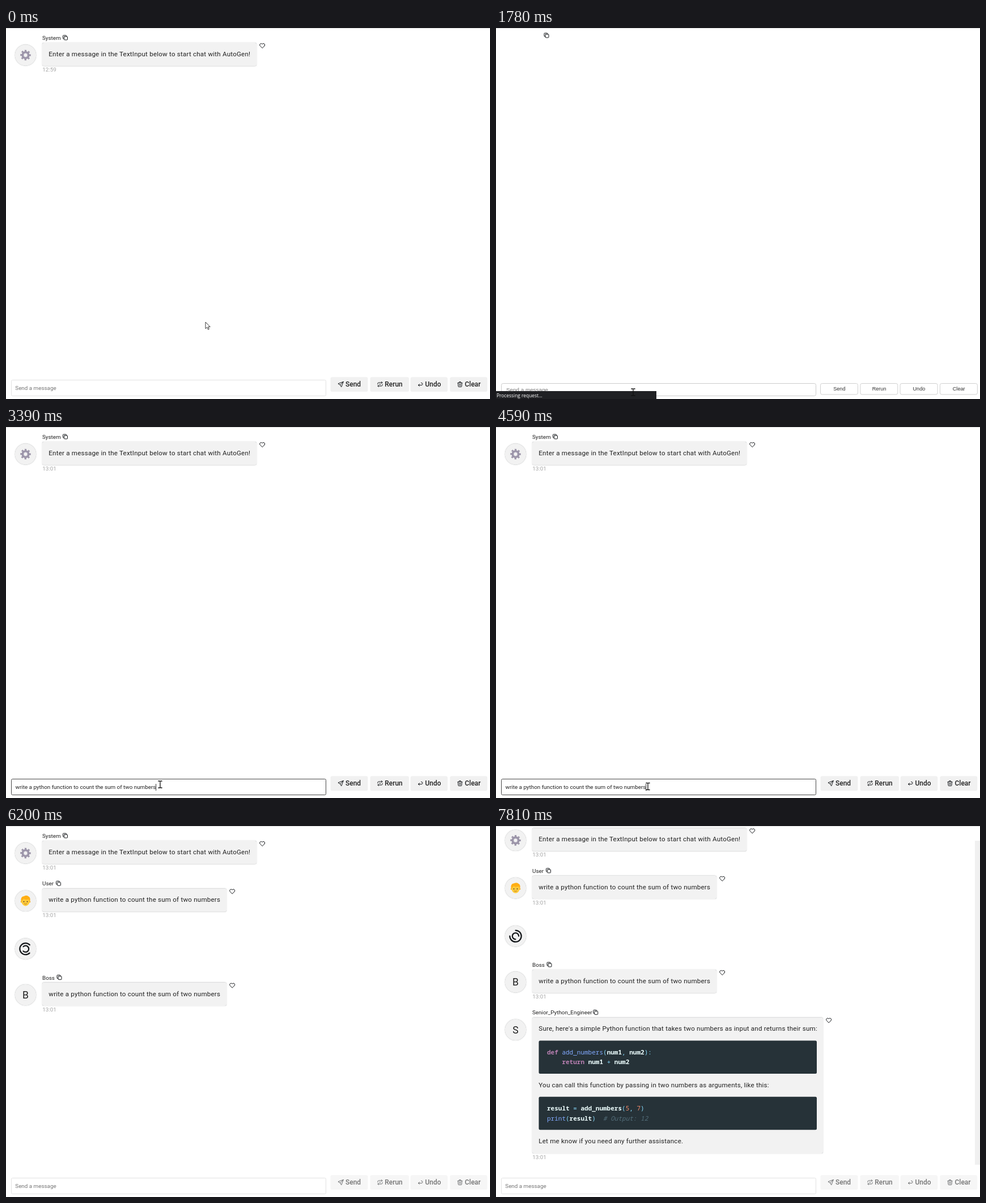
Recreate the animation shown at these times as an HTML page. Size 854x656 px, loop 8 s.

```html
<!DOCTYPE html>
<html lang="en">
<head>
<meta charset="utf-8">
<title>Chat</title>
<style>
html, body { margin: 0; width: 100%; height: 100%; overflow: hidden; background: #fff; }
svg { display: block; }
#stage { width: 100%; height: 100%; }
text { font: 9.86px Roboto, sans-serif; fill: #212121; white-space: pre; }
.body { font-size: 11.6px; letter-spacing: .2px; }
.time { fill: #a6a6a6; }
.hint { fill: #757575; }
.initial { font-size: 17.6px; text-anchor: middle; }
.label { font-size: 12px; font-weight: 500; }
.plain { font: 9.15px "Liberation Sans", sans-serif; fill: #333; text-anchor: middle; }
.plainHint { font: 9.86px "Liberation Sans", sans-serif; fill: #757575; }
.status { font: 8.4px "Open Sans", sans-serif; fill: #fff; }
.card { fill: #f2f2f2; filter: drop-shadow(0 .8px .5px rgba(60,64,67,.4)) drop-shadow(0 .7px .9px rgba(60,64,67,.18)); }
.icon { fill: none; stroke: #15181b; stroke-width: 2; stroke-linecap: round; stroke-linejoin: round; }
.code { font: 11px "Noto Sans Mono", monospace; fill: #89ddff; }
.code .k { fill: #bb80b3; font-weight: 700; }
.code .f { fill: #82aaff; }
.code .n { fill: #eeffff; font-weight: 600; }
.code .d { fill: #f78c6c; }
.code .c { fill: #546e7a; font-style: italic; }
</style>
</head>
<body>
<svg id="stage" viewBox="0 0 854 656" preserveAspectRatio="none"></svg>
<script>
const ICONS = {
  copy: 'M10 8h8a2 2 0 0 1 2 2v8a2 2 0 0 1-2 2h-8a2 2 0 0 1-2-2v-8a2 2 0 0 1 2-2zM16 8v-2a2 2 0 0 0-2-2h-8a2 2 0 0 0-2 2v8a2 2 0 0 0 2 2h2',
  heart: 'M19.5 12.57l-7.5 7.43l-7.5-7.43a5 5 0 1 1 7.5-6.57a5 5 0 1 1 7.5 6.57',
  send: 'M10 14l11-11M21 3l-6.5 18a.55.55 0 0 1-1 0l-3.5-7l-7-3.5a.55.55 0 0 1 0-1l18-6.5',
  rerun: 'M4 12v-3a3 3 0 0 1 3-3h13m-3-3l3 3l-3 3M20 12v3a3 3 0 0 1-3 3h-13m3 3l-3-3l3-3M11 11l1-1v4',
  undo: 'M9 11l-4 4l4 4m-4-4h11a4 4 0 0 0 0-8h-1',
  clear: 'M4 7h16M10 11v6M14 11v6M5 7l1 12a2 2 0 0 0 2 2h8a2 2 0 0 0 2-2l1-12M9 7v-3a1 1 0 0 1 1-1h4a1 1 0 0 1 1 1v3',
  loader: 'M3 12a9 9 0 0 0 18 0a9 9 0 0 0-9-9M17 12a5 5 0 1 0-5 5'
};
const REQUEST = 'write a python function to count the sum of two numbers';

const text = (x, y, s, cls = '', id = '') => `<text x="${x}" y="${y}" class="${cls}" id="${id}">${s}</text>`;
const rect = (x, y, w, h, r, attrs) => `<rect x="${x}" y="${y}" width="${w}" height="${h}" rx="${r}" ${attrs}/>`;
const icon = (name, x, y, scale = .5) =>
  `<path class="icon" d="${ICONS[name]}" transform="translate(${x} ${y}) scale(${scale}) translate(-12 -12)"/>`;
const group = (id, content, attrs = '') => `<g id="${id}" ${attrs}>${content}</g>`;
const avatar = (y, content) => `<g transform="translate(34.5 ${y})"><circle r="18.7" class="card"/>${content}</g>`;
const initial = letter => text(0, 6.2, letter, 'initial');

function message({ id, y, name, copyX, face, right, height = 41.3, body, timeId = '' }) {
  return group(id,
    text(64, 21, name) + icon('copy', copyX, 17) + avatar(48, face) +
    rect(64, 26, right - 64, height, 3, 'class="card"') + body +
    icon('heart', right + 10.2, 31.5) + text(64.3, 35.8 + height, '13:01', 'time', timeId),
    `transform="translate(0 ${y})"`);
}

const gear = `<g fill="none" stroke="#9b94a8">
  <circle r="7.9" stroke-width="2.8" stroke-dasharray="3.1 3.104" transform="rotate(-101)"/>
  <circle r="5.3" stroke-width="3.6"/><circle r="3.5" stroke="#bcb6c6"/></g>`;

const person = `<circle cx="-7.2" cy="1.5" r="1.6" fill="#f5b52e"/><circle cx="7.2" cy="1.5" r="1.6" fill="#f5b52e"/>
  <ellipse cy="1" rx="7" ry="8" fill="#ffca3a"/>
  <path d="M-7.6 1C-9-4-7-8-3-8.2C0-10 4-9.4 5.2-7.8C8.4-6.5 8.6-2 7.6 1C6-1 6-2 5-3.2C2-1.7-1-2-3-3.6C-5-2.5-6-1-7.6 1z" fill="#ffae13"/>
  <g fill="#5a4030"><circle cx="-3" cy="1.4" r="1"/><circle cx="3" cy="1.4" r="1"/></g>
  <path d="M-2.4 5q2.4 1.6 4.8 0" fill="none" stroke="#a8702a" stroke-width=".9"/>`;

// Marks tokens as {class:content}
const code = (y, source) =>
  text(90, y, source.replace(/\{(\w):([^}]*)\}/g, '<tspan class="$1">$2</tspan>'), 'code');
const codeBox = y => rect(75.5, y, 490.5, 58.5, 2.5, 'fill="#263238"');

const answer =
  text(75.3, 50, "Sure, here's a simple Python function that takes two numbers as input and returns their sum:", 'body') +
  codeBox(67) +
  code(91.5, '{k:def} {f:add_numbers}({n:num1}, {n:num2}):') +
  code(109, '    {k:return} {n:num1} + {n:num2}') +
  text(75.3, 149.5, 'You can call this function by passing in two numbers as arguments, like this:', 'body') +
  codeBox(166.3) +
  code(190.7, '{n:result} = {n:add_numbers}({d:5}, {d:7})') +
  code(208.3, '{f:print}({n:result})  {c:# Output: 12}') +
  text(75.3, 248.7, 'Let me know if you need any further assistance.', 'body');

const request = text(75.3, 50, REQUEST, 'body');
const chat = group('chat',
  message({ id: 'system', y: 0, name: 'System', copyX: 104.5, face: gear, right: 442, timeId: 'clock',
    body: text(75.3, 50, 'Enter a message in the TextInput below to start chat with AutoGen!', 'body') }) +
  message({ id: 'user', y: 84.4, name: 'User', copyX: 92.5, face: person, right: 389, body: request }) +
  group('waiting', avatar(217.3, group('spinner', icon('loader', 0, 0, 1.13)))) +
  message({ id: 'boss', y: 250.6, name: 'Boss', copyX: 94, face: initial('B'), right: 389, body: request }) +
  message({ id: 'engineer', y: 335, name: 'Senior_Python_Engineer', copyX: 175.7, face: initial('S'),
    right: 577, height: 240.5, body: answer }));

const button = (x, w, name, iconX, textX, label) =>
  rect(x, 617.3, w, 25.9, 3, 'fill="#f1f1f1"') + icon(name, iconX, 630) + text(textX, 634, label, 'label');
const buttons = group('buttons',
  button(572.5, 66, 'send', 590.7, 599, 'Send') + button(642.5, 68.5, 'rerun', 660, 668.3, 'Rerun') +
  button(713.7, 65.5, 'undo', 731, 739.5, 'Undo') + button(783.3, 66, 'clear', 801, 809.5, 'Clear'));

const unstyled = group('unstyled',
  icon('copy', 89, 13) +
  rect(9.5, 628.5, 555, 22, 3, 'fill="#fff" stroke="#ccc"') + text(18, 642.6, 'Send a message', 'plainHint') +
  ['Send', 'Rerun', 'Undo', 'Clear'].map((label, i) =>
    rect(572.5 + 70.3 * i, 628.5, 66, 19.5, 3, 'fill="#fff" stroke="#d0d0d0"') +
    text(605.8 + 70.3 * i, 641, label, 'plain')).join(''));

const stage = document.getElementById('stage');
stage.innerHTML =
  '<clipPath id="view"><rect y="1" width="854" height="598"/></clipPath>' +
  rect(0, 0, 854, 1, 0, 'fill="#dcdcdc"') +
  group('styled',
    group('feed', chat, 'clip-path="url(#view)"') +
    rect(845, 26, 9, 573, 0, 'fill="#f0f0f0" id="scrollbar"') + buttons +
    rect(9.5, 622.5, 555, 28, 2, 'fill="#fff" id="field"') +
    text(16.3, 640, 'Send a message', 'hint', 'hint') + text(16.6, 640, REQUEST, '', 'typed') +
    rect(264.2, 631, .9, 12, 0, 'fill="#222" id="caret"')) +
  unstyled +
  group('status', rect(0, 642, 283, 14, 0, 'fill="#202124"') + text(1, 653.3, 'Processing request...', 'status')) +
  '<path id="arrow" d="M0 0V11.6L2.7 9.1L4.6 13.2L6.4 12.3L4.6 8.4H8.2Z" fill="#fff" stroke="#222" stroke-width=".9"/>' +
  '<path id="beam" d="M-3.6-6h2.6l1 .7l1-.7h2.6M0-5.3V5.3M-3.6 6h2.6l1-.7l1 .7h2.6" fill="none" stroke="#111" stroke-width="1.3"/>';

const $ = id => document.getElementById(id);
const show = (id, on) => $(id).setAttribute('display', on ? 'inline' : 'none');
const move = (id, x, y) => $(id).setAttribute('transform', `translate(${x} ${y})`);

// Pointer poses: time, shape, x, y
const POINTER = [
  [0, 'arrow', 352, 520], [1400, 'arrow', 318, 565], [1590, 'beam', 258, 638], [1780, 'beam', 242, 644],
  [1990, 'beam', 256, 644], [2190, 'beam', 268, 644.5], [2380, 'beam', 275, 644.5],
  [2590, 'beam', 271, 640], [2790, 'beam', 268, 635.5], [3390, 'beam', 272, 632], [3590, 'beam', 268, 635.5],
  [4790, 'beam', 264, 636], [5000, 'beam', 259, 636.5], [6010, 'none', 0, 0]
];

function draw(t) {
  const between = (from, to = 8000) => t >= from && t < to;
  const [, shape, x, y] = POINTER.findLast(pose => t >= pose[0]);
  for (const id of ['arrow', 'beam']) {
    show(id, id === shape);
    move(id, x, y);
  }

  show('styled', !between(1400, 1990));
  show('unstyled', between(1780, 1990));
  show('status', between(990, 1990));
  $('clock').textContent = t < 1400 ? '12:59' : '13:01';

  show('typed', between(3200, 4790));
  show('hint', !between(3200, 4790));
  show('caret', between(3200, 3990) || between(4590, 4790));
  $('field').setAttribute('stroke', between(2190, 6010) ? '#484848' : '#e2e2e2');
  $('buttons').setAttribute('opacity', t < 4790 ? 1 : .62);

  show('user', t >= 4790);
  show('waiting', t >= 5000);
  show('boss', t >= 5200);
  const answered = t >= 7810;
  show('engineer', answered);
  show('scrollbar', answered);
  move('chat', 0, answered ? -22.6 : 0);

  // The spinner advances about five times a second
  const tick = Math.floor((t - 5000 + 2) / 200.8) * 200.8 + 5000;
  const angle = tick < 7200 ? 315 + (tick - 5400) * .3 : 135 + (tick - 7210) * .375;
  $('spinner').setAttribute('transform', `rotate(${angle})`);
}

const start = performance.now();
function frame() {
  draw((performance.now() - start) % 8000);
  requestAnimationFrame(frame);
}
frame();
</script>
</body>
</html>
```
